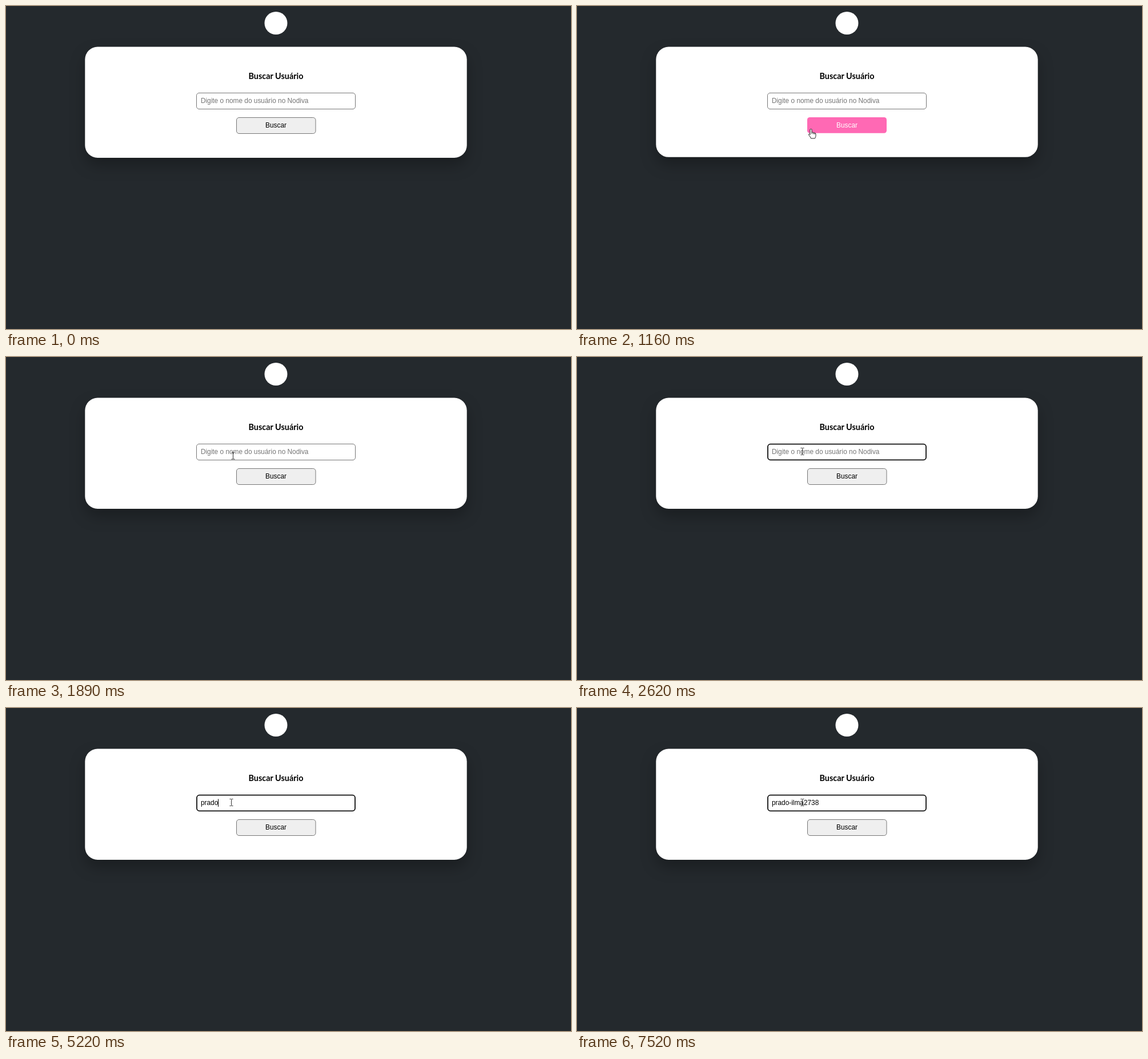
These frames come from a looping animation (989 px wide and 566 px high, 7990 ms). An HTML page:

```html
<!DOCTYPE html>
<html lang="pt-BR">
<head>
<meta charset="utf-8">
<style>
html, body { margin: 0; height: 100%; overflow: hidden; background: #24292d; }
svg { display: block; width: 989px; height: 566px; }
text { font: 11.87px "Liberation Sans", Arial, sans-serif; }
.mid { text-anchor: middle; }
#title { font: 700 14.4px Lato, sans-serif; }
#card { fill: #fff; filter: drop-shadow(0 13px 13px #0004); }
</style>
</head>
<body>
<svg viewBox="0 0 989 566">
  <circle cx="472.5" cy="30" r="20" fill="#fff"/>
  <rect id="card" x="138.3" y="71.6" width="668.4" rx="22"/>
  <text id="title" class="mid" x="472.5" y="127.5">Buscar Usuário</text>
  <rect id="field" fill="#fff"/>
  <text id="entry" x="340.9" y="170"></text>
  <rect id="caret" y="159.5" width="1" height="13.5"/>
  <rect id="button" x="403.5" y="195.5" width="138.5" rx="4.5"/>
  <text id="label" class="mid" x="472.5">Buscar</text>
  <g id="cursor" stroke-linejoin="round">
    <path id="arrow" d="M0 0V16L3.8 12.5 6.3 18 8.8 17 6.4 11.5H11.5Z" fill="#fff" stroke="#000"/>
    <path id="hand" d="M-1.5 10V1.5Q-1.5 0 0 0T1.5 1.5V6q1.5-1 2.6.5q1.5-.6 2.4.7q2-.2 2 1.8V12q0 2-1.5 4.5H0q-1-3-3.8-6q-.7-1.6.8-1.9q1 0 1.5 1.4ZM1.5 6V8.5M4.1 6.5V9M6.5 7.2V9.5" fill="#fff" stroke="#222"/>
    <path id="beam" d="M-3-6H-1Q0-6 0-5Q0-6 1-6H3M0-5V5M-3 6H-1Q0 6 0 5Q0 6 1 6H3" fill="none" stroke="#333"/>
  </g>
</svg>
<script>
const LOOP = 7990, HOVER = [930, 1890], FOCUS = 2100;
const HINT = "Digite o nome do usuário no Nodiva", USER = "prado-ilma2738";

// time, x, y, shape
const moves = [
  [590, 921, 549, "arrow"], [660, 768, 482, "arrow"], [730, 573, 428, "arrow"],
  [800, 466, 372, "arrow"], [860, 425, 317, "arrow"], [930, 412, 219, "hand"],
  [1030, 410, 216, "hand"], [1160, 409.5, 215.5, "hand"], [1820, 405, 202, "hand"],
  [1890, 397.5, 173, "beam"], [1960, 395.5, 168, "beam"], [2030, 394.5, 165.5, "beam"]
];
// time at which each letter appears
const keys = [3100, 3700, 3760, 3890, 4160, 5440, 5640, 5910, 6010, 6110, 6380, 6580, 6850, 6920];

const $ = id => document.getElementById(id);
const set = (id, attrs) => {
  for (const k in attrs) $(id).setAttribute(k, attrs[k]);
};
const show = (id, on) => set(id, { visibility: on ? "visible" : "hidden" });

function draw(t) {
  const hover = t >= HOVER[0] && t < HOVER[1], focus = t >= FOCUS;
  set("card", { height: hover ? 193.2 : 194.4 });
  set("button", hover
    ? { x: 403, y: 195, width: 139, height: 27.8, fill: "#ff69b4", stroke: "none" }
    : { x: 403.5, y: 195.5, width: 138.5, height: 28, fill: "#efefef", stroke: "#767676" });
  set("label", { y: hover ? 212.5 : 213, fill: hover ? "#fff" : "#000" });
  set("field", focus
    ? { x: 334, y: 152.7, width: 277, height: 27.6, rx: 4.5, stroke: "#101010", "stroke-width": 1.8 }
    : { x: 333.5, y: 152.4, width: 278, height: 28.2, rx: 4.5, stroke: "#767676", "stroke-width": 1 });

  const typed = keys.filter(k => k <= t).length;
  $("entry").textContent = typed ? USER.slice(0, typed) : HINT;
  set("entry", { fill: typed ? "#000" : "#757575" });

  const since = t - (typed ? keys[typed - 1] : FOCUS - 10);
  const half = typed === keys.length ? 600 : 530;
  show("caret", focus && Math.floor(since / half) % 2 === 0);
  set("caret", { x: 341 + (typed ? $("entry").getComputedTextLength() - .3 : 0) });

  const at = moves.filter(m => m[0] <= t).pop();
  for (const id of ["arrow", "hand", "beam"]) show(id, at && at[3] === id);
  if (at) set("cursor", { transform: `translate(${at[1]} ${at[2]})` });
}

function tick() {
  draw(performance.now() % LOOP);
  requestAnimationFrame(tick);
}
tick();
</script>
</body>
</html>
```
